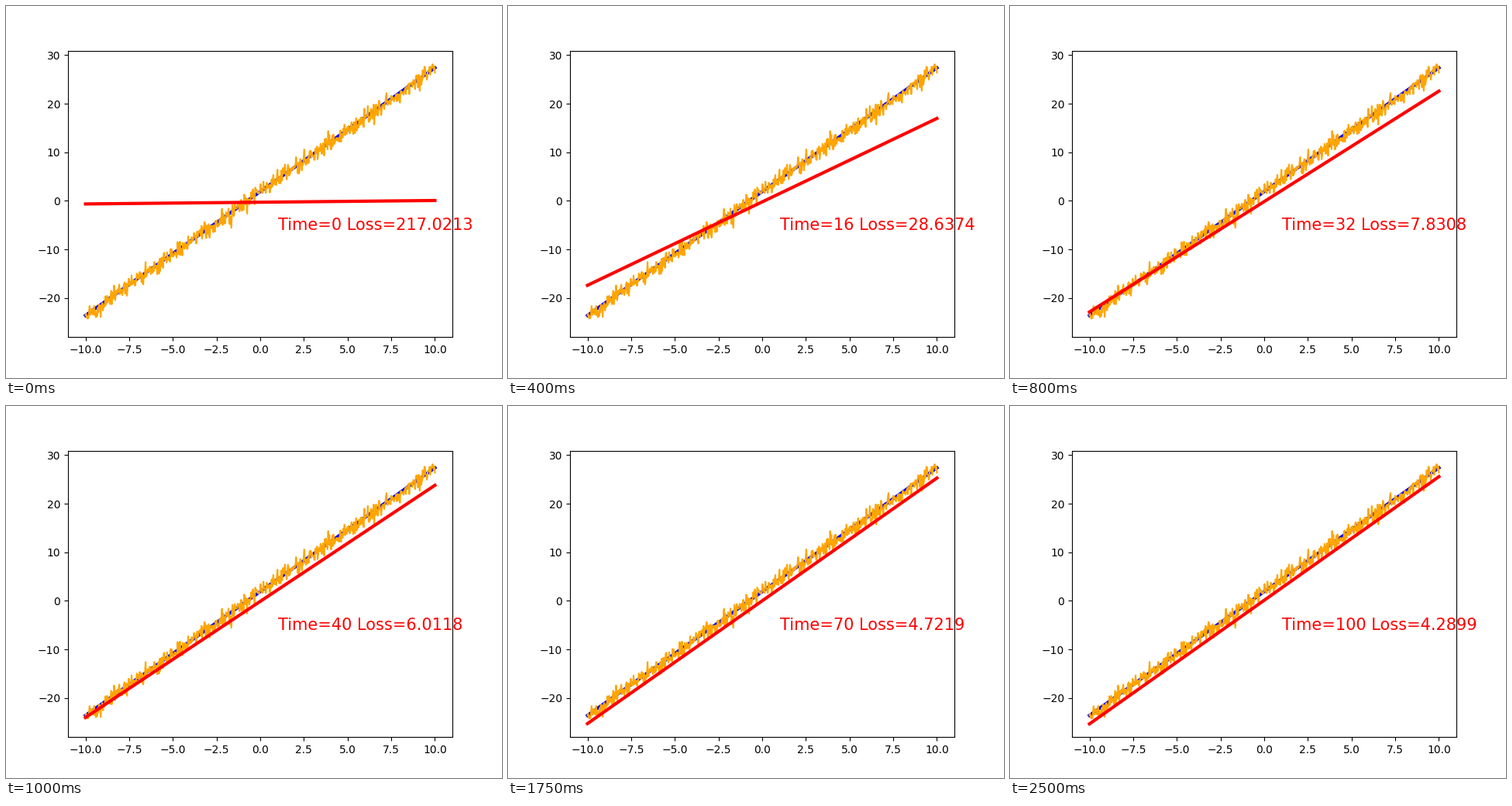
These frames come from a looping animation (640 by 480 pixels, 2.55 s). A matplotlib script:

```python
import numpy as np
import matplotlib.pyplot as plt
from matplotlib.animation import FuncAnimation

FRAMES, INTERVAL = 51, 50
STEPS_PER_FRAME = 2
RATE = 0.001

# Noisy samples of a straight line
x = np.linspace(-10, 10, 600)
truth = 2.55 * x + 1.9
samples = truth + np.random.default_rng(7).normal(0, 1, x.size)

# Gradient descent on the squared error, in closed form
SPREAD = np.mean(x ** 2)
SLOPE_LOSS, BIAS_LOSS, NOISE_LOSS = 211.11428, 4.9017, 1.0053
BEST_SLOPE, BEST_BIAS = 2.548, 1.93
SLOPE_DECAY = 1 - 2 * RATE * SPREAD
BIAS_DECAY = 1 - 2 * RATE


def fit(step):
    """Return the slope, bias and loss after a number of steps."""
    s, b = SLOPE_DECAY ** step, BIAS_DECAY ** step
    slope = BEST_SLOPE - np.sqrt(SLOPE_LOSS / SPREAD) * s
    bias = BEST_BIAS - np.sqrt(BIAS_LOSS) * b
    loss = SLOPE_LOSS * s ** 2 + BIAS_LOSS * b ** 2 + NOISE_LOSS
    return slope, bias, loss


fig, ax = plt.subplots(figsize=(6.4, 4.8), dpi=100)
ax.plot(x, truth, color="blue", lw=3)
ax.plot(x, samples, color="orange", lw=1.5)
line, = ax.plot([], [], color="red", lw=3)
label = ax.text(1, -6, "", color="red", fontsize=15)
ax.set_xlim(-11, 11)
ax.set_ylim(-28.05, 30.925)


def update(frame):
    step = frame * STEPS_PER_FRAME
    slope, bias, loss = fit(step)
    line.set_data(x, slope * x + bias)
    label.set_text(f"Time={step} Loss={loss:.4f}")
    return line, label


anim = FuncAnimation(fig, update, frames=FRAMES, interval=INTERVAL,
                     repeat=True, repeat_delay=0)
plt.show()
```
